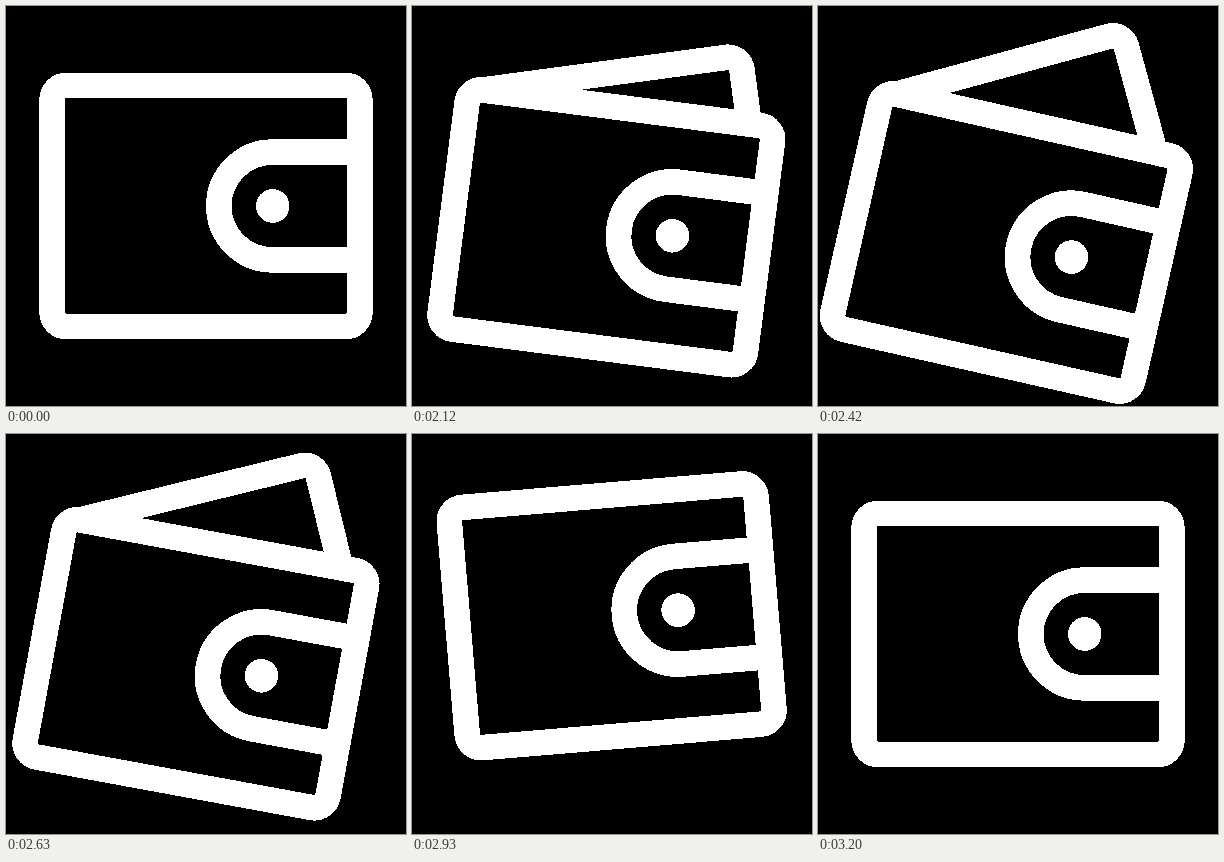
Recreate the animation shown at these times as an HTML page. Size 400 by 400 pixels, loop 3.26 s.

```html
<!DOCTYPE html>
<html lang="en">
<head>
<meta charset="utf-8">
<title>Wallet</title>
<style>
  html, body { margin: 0; height: 100%; overflow: hidden; background: #000; }
  svg { display: block; width: 100vw; height: 100vh; }
</style>
</head>
<body>
<svg viewBox="0 0 400 400" fill="none" stroke="#fff" stroke-width="25.6" shape-rendering="crispEdges">
  <g id="wallet">
    <path id="card" stroke-linecap="round"/>
    <rect x="46.1" y="79.5" width="307.8" height="241" rx="14" fill="#000"/>
    <path d="M354 146.1H266.7a53.9 53.9 0 0 0 0 107.8H354"/>
    <circle cx="266.7" cy="200" r="16.8" fill="#fff" stroke="none"/>
  </g>
</svg>
<script>
const LOOP = 3260, START = 2000, STEP = 30, END = 1200;
const wallet = document.getElementById('wallet');
const card = document.getElementById('card');

const progress = (t, from, to) => Math.min(1, Math.max(0, (t - from) / (to - from)));
const swing = (t, from, to) => (1 - Math.cos(Math.PI * progress(t, from, to))) / 2;

// Quick start with a long settle: cubic-bezier(.2, .25, .14, 1)
function settle(t, from, to) {
  const x = progress(t, from, to);
  const bezier = (s, a, b) => 3 * s * (1 - s) ** 2 * a + 3 * s * s * (1 - s) * b + s ** 3;
  let low = 0, high = 1;
  for (let i = 0; i < 20; i++) {
    const mid = (low + high) / 2;
    if (bezier(mid, .2, .14) < x) low = mid; else high = mid;
  }
  return bezier((low + high) / 2, .25, 1);
}

function draw(t) {
  const open = settle(t, 0, 500);
  const drop = swing(t, 548, 891);
  const back = swing(t, 891, END);

  const tilt = 12.8 * open - 17.8 * drop + 5 * back;
  const shiftX = -2.7 * (swing(t, 500, 780) - back);
  const shiftY = -4 * (swing(t, 590, 780) - back);
  wallet.setAttribute('transform',
    `translate(${shiftX} ${shiftY}) rotate(${tilt} 30 166)`);

  const angle = 28.2 * (settle(t, 12, 502) - swing(t, 568, 818));
  const length = 293.5 - 59.5 * (open - drop);
  card.setAttribute('d', `M0 0H${length - 14}a14 14 0 0 1 14 14V130`);
  card.setAttribute('transform', `translate(60 79.5) rotate(${-angle})`);
}

function tick() {
  const t = performance.now() % LOOP - START;
  draw(Math.min(END, Math.max(0, Math.floor(t / STEP) * STEP)));
  requestAnimationFrame(tick);
}
tick();
</script>
</body>
</html>
```
